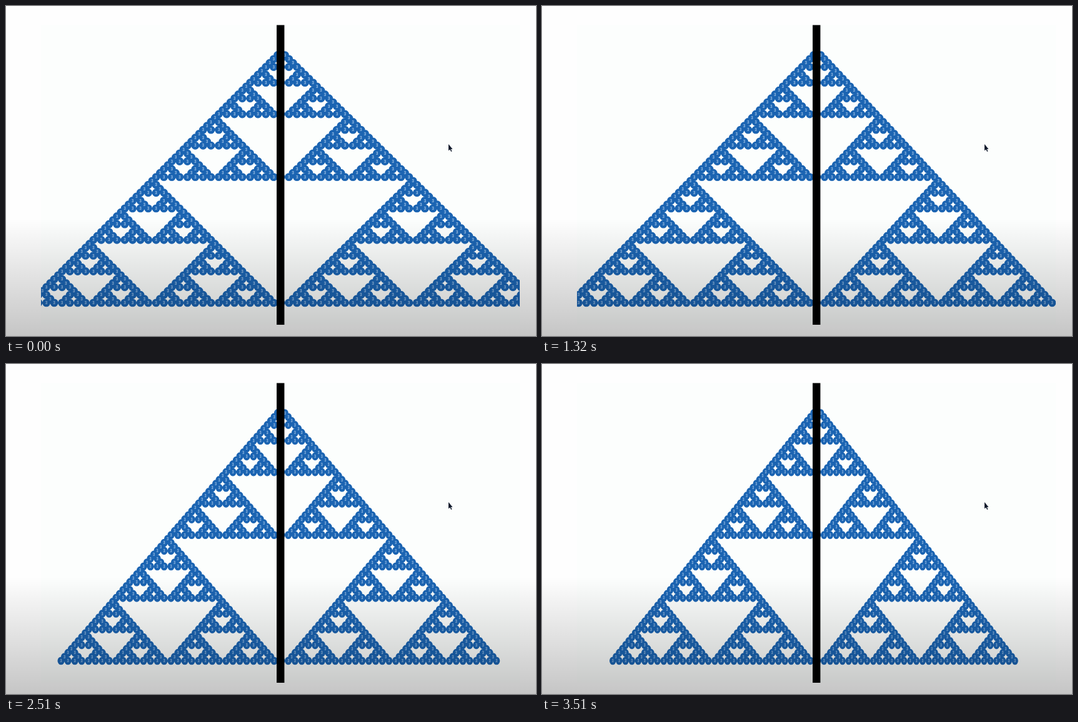
Recreate the animation shown at these times as an HTML page with a canvas. Size 848 px wide and 528 px high, loop 3.57 s.

```html
<!DOCTYPE html>
<html>
<head>
<meta charset="utf-8">
<style>
  html, body { margin: 0; width: 100%; height: 100%; overflow: hidden; }
  canvas { display: block; }
</style>
</head>
<body>
<canvas id="stage" width="848" height="528"></canvas>
<script>
const ctx = document.getElementById('stage').getContext('2d');
const LOOP = 3570, STEP = LOOP / 54;
const ROWS = 64, PITCH = 6.29, TOP = 78.6, RADIUS = 6.45;

const shade = ctx.createLinearGradient(0, 340, 0, 528);
shade.addColorStop(0, 'rgba(0,0,0,0)');
shade.addColorStop(1, 'rgba(0,0,0,.225)');

const ramp = (t, from, to) => Math.min(1, Math.max(0, (t - from) / (to - from)));

// Half the horizontal distance between dots: the right side narrows steadily,
// the left side waits, then narrows in two bursts with a slow stretch between
const rightSpacing = t => 6.4 - .00042 * t;
const leftSpacing = t => 6.27 - .7 * ramp(t, 1100, 2110)
  - .17 * ramp(t, 2110, 2910) - .3 * ramp(t, 2910, 3300);

// Odd entries of Pascal's triangle
const dots = [];
for (let row = 0; row < ROWS; row++)
  for (let k = 0; k <= row; k++)
    if ((row & k) === k) dots.push([(2 * k - row) * PITCH, row * PITCH]);

function drawHalf(center, spacing, clipLeft, clipRight) {
  ctx.save();
  ctx.beginPath();
  ctx.rect(clipLeft, 0, clipRight - clipLeft, 528);
  ctx.clip();
  ctx.translate(center, TOP);
  ctx.scale(spacing / PITCH, 1);
  ctx.fillStyle = '#1b64b2';
  ctx.beginPath();
  for (const [x, y] of dots) {
    ctx.moveTo(x + RADIUS, y);
    ctx.arc(x, y, RADIUS, 0, 2 * Math.PI);
  }
  ctx.fill();
  ctx.fillStyle = 'rgba(225,240,255,.65)';
  for (const [x, y] of dots) ctx.fillText('3', x, y + .4);
  ctx.restore();
}

function drawPointer() {
  ctx.fillStyle = '#101a2c';
  ctx.fill(new Path2D('M708 221v10.5l2.3-2 1.8 3.6 1.5-.7-1.8-3.5h2.7z'));
}

function draw(now) {
  const t = Math.floor((now % LOOP) / STEP) * STEP;
  ctx.fillStyle = '#fefefe';
  ctx.fillRect(0, 0, 848, 528);
  ctx.fillStyle = '#fcfefd';
  ctx.fillRect(56, 30, 766, 480);
  ctx.font = 'bold 6.5px "Liberation Sans", sans-serif';
  ctx.textAlign = 'center';
  ctx.textBaseline = 'middle';
  drawHalf(434.5, leftSpacing(t), 56, 433);
  drawHalf(446.3, rightSpacing(t), 445, 822);
  ctx.fillStyle = shade;
  ctx.fillRect(0, 340, 848, 188);
  ctx.fillStyle = '#000';
  ctx.fillRect(433, 30.5, 12.4, 479.5);
  drawPointer();
}

const start = performance.now();
(function frame() {
  draw(performance.now() - start);
  requestAnimationFrame(frame);
})();
</script>
</body>
</html>
```
